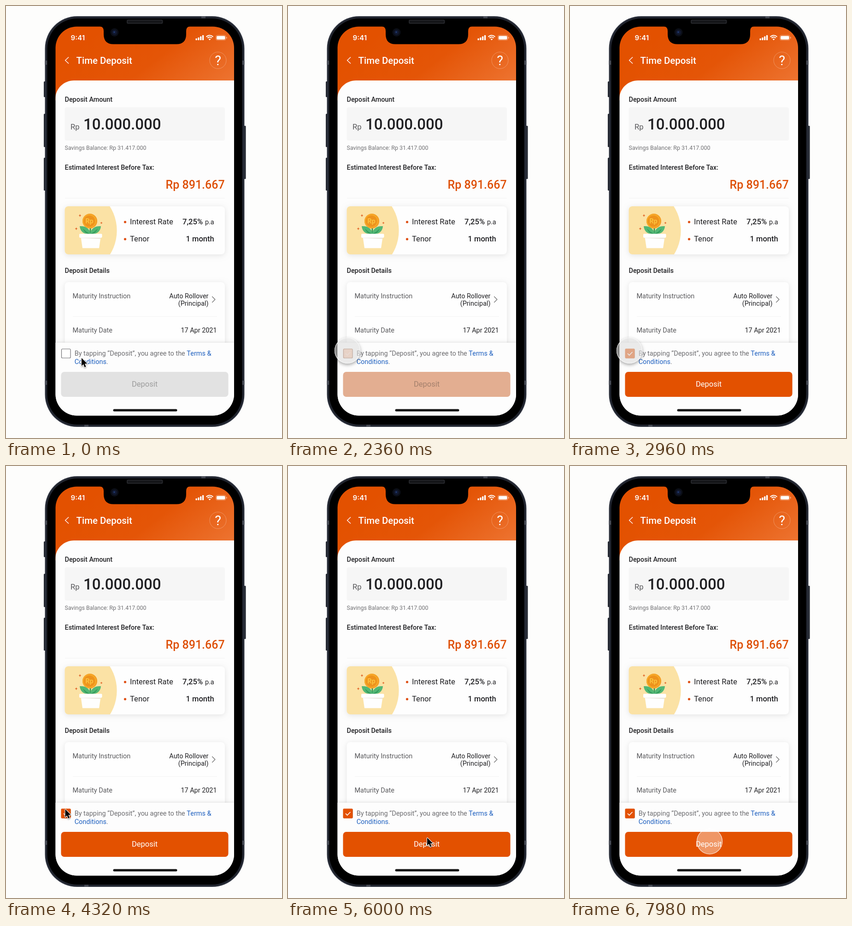
An HTML page with a canvas for the animation above (8 s loop, 599 by 934 pixels).

```html
<!DOCTYPE html>
<html lang="en">
<head>
<meta charset="utf-8">
<title>Time Deposit</title>
<style>
  html, body { margin: 0; width: 100%; height: 100%; overflow: hidden; background: #fdfdfc; }
  canvas { display: block; width: 599px; height: 934px; }
</style>
</head>
<body>
<canvas id="stage"></canvas>
<script>
const W = 599, H = 934, LOOP = 8000;
const ORANGE = '#e35100', INK = '#1f1f22', GREY = '#58585b', PAPER = '#fdfdfd';
const canvas = document.getElementById('stage');
const dpr = Math.max(1, window.devicePixelRatio || 1);
canvas.width = W * dpr;
canvas.height = H * dpr;
const c = canvas.getContext('2d');

const clamp = v => Math.min(1, Math.max(0, v));
const ramp = (t, from, to) => clamp((t - from) / (to - from));
const easeInOut = p => p < .5 ? 4 * p ** 3 : 1 - 4 * (1 - p) ** 3;
const mix = (a, b, p) => a + (b - a) * p;

function box(x, y, w, h, r, fill) {
  c.beginPath();
  c.roundRect(x, y, w, h, r);
  if (fill) { c.fillStyle = fill; c.fill(); }
}

function disc(x, y, r, fill) {
  c.beginPath();
  c.arc(x, y, r, 0, Math.PI * 2);
  c.fillStyle = fill;
  c.fill();
}

function poly(points, fill) {
  c.beginPath();
  points.forEach(([x, y]) => c.lineTo(x, y));
  c.closePath();
  c.fillStyle = fill;
  c.fill();
}

function line(points, color, width) {
  c.beginPath();
  points.forEach(([x, y]) => c.lineTo(x, y));
  c.strokeStyle = color;
  c.lineWidth = width;
  c.stroke();
}

function text(s, x, y, size, color = INK, weight = 400, align = 'left', family = 'Roboto') {
  c.font = `${weight} ${size}px ${family}, sans-serif`;
  c.textAlign = align;
  c.fillStyle = color;
  c.fillText(s, x, y);
}

// Draws with a soft shadow, then restores the context.
function shaded(color, blur, dy, draw) {
  c.save();
  c.shadowColor = color;
  c.shadowBlur = blur * dpr;
  c.shadowOffsetY = dy * dpr;
  draw();
  c.restore();
}

function faded(alpha, draw) {
  if (alpha <= 0) return;
  c.save();
  c.globalAlpha = alpha;
  draw();
  c.restore();
}

function phoneBody() {
  const metal = '#22262f', band = '#484c56';
  [[163, 34], [233, 72], [328, 71]].forEach(([y, h]) => box(82, y, 5, h, 1.5, metal));
  box(515, 259, 5.5, 115, 1.5, metal);
  box(84.5, 22, 433, 888, 70, '#343944');
  box(86, 23.5, 430, 885, 68.5, '#20242e');
  [118, 810].forEach(y => {
    box(84.5, y, 5, 9, 0, band);
    box(512.5, y, 5, 9, 0, band);
  });
  box(424, 22, 9, 4.5, 0, band);
  box(170, 905.5, 9, 4.5, 0, band);
  box(89.5, 27, 423, 878, 65, '#000');
}

function notch() {
  c.beginPath();
  c.moveTo(204, 44);
  c.quadraticCurveTo(212, 45, 212, 54);
  c.lineTo(212, 61);
  c.quadraticCurveTo(212, 82.5, 233, 82.5);
  c.lineTo(370, 82.5);
  c.quadraticCurveTo(391, 82.5, 391, 61);
  c.lineTo(391, 54);
  c.quadraticCurveTo(391, 45, 399, 44);
  c.closePath();
  c.fillStyle = '#000';
  c.fill();
  box(262, 29.5, 78.5, 9, 3, '#25262a');
  box(264, 31.5, 74.5, 5, 2, '#141518');
  disc(235.5, 57, 9, '#0b0e17');
  disc(235.5, 57, 5.5, '#11182f');
  disc(235, 56.5, 2, '#1f3669');
}

function statusBar() {
  text('9:41', 140.5, 73.5, 15.2, '#fff', 600, 'left', 'Inter');
  [4, 6, 8.5, 11].forEach((h, i) => box(411.5 + i * 4.8, 74 - h, 3.3, h, 1, '#fff'));
  c.strokeStyle = '#fff';
  c.lineWidth = 2;
  [10, 6.3].forEach(r => {
    c.beginPath();
    c.arc(442, 73.6, r, -Math.PI * .76, -Math.PI * .24);
    c.stroke();
  });
  poly([[442, 74.2], [439.6, 71.6], [440.8, 70.8], [443.2, 70.8], [444.4, 71.6]], '#fff');
  box(455.5, 63.2, 21.5, 10.8, 3.2);
  c.strokeStyle = 'rgba(255,255,255,.4)';
  c.lineWidth = 1;
  c.stroke();
  box(457, 64.7, 18.5, 7.8, 2, '#fff');
  box(478, 66.8, 1.5, 3.8, 1, 'rgba(255,255,255,.5)');
}

function header() {
  const g = c.createLinearGradient(230, 30, 400, 250);
  g.addColorStop(0, '#e35100');
  g.addColorStop(.45, '#e45507');
  g.addColorStop(1, '#ee7634');
  c.fillStyle = g;
  c.fillRect(107, 44, 389, 160);
  line([[136, 110.5], [128.6, 117.5], [136, 124.5]], '#fff', 1.3);
  text('Time Deposit', 152.6, 124.7, 20.4, '#fff', 500);
  c.beginPath();
  c.arc(460, 117.5, 18, 0, Math.PI * 2);
  c.strokeStyle = 'rgba(255,255,255,.28)';
  c.lineWidth = 1;
  c.stroke();
  text('?', 460, 127.8, 29, '#fff', 400, 'center');
}

function leaf(dir) {
  c.save();
  c.translate(183, 493);
  c.scale(dir, 1);
  c.beginPath();
  c.moveTo(0, 0);
  c.bezierCurveTo(1, -12, 10, -18, 23, -17);
  c.bezierCurveTo(22, -5, 14, 1, 0, 0);
  c.fillStyle = '#52b774';
  c.fill();
  c.beginPath();
  c.moveTo(0, 0);
  c.quadraticCurveTo(10, -5, 16, -12);
  c.quadraticCurveTo(12, 0, 0, 0);
  c.fillStyle = '#349a5c';
  c.fill();
  c.restore();
}

function sparkle(x, y, r) {
  const pts = [];
  for (let i = 0; i < 8; i++) {
    const a = i * Math.PI / 4, d = i % 2 ? r * .35 : r;
    pts.push([x + d * Math.cos(a), y + d * Math.sin(a)]);
  }
  poly(pts, '#dd571c');
}

function plant() {
  c.save();
  box(127.5, 433, 347.5, 104, 8);
  c.clip();
  disc(143.4, 485.5, 97.2, '#fbe2a5');
  c.restore();
  box(181.5, 476, 3, 18, 1, '#349a5c');
  leaf(1);
  leaf(-1);
  disc(182, 465, 16, '#f39a21');
  disc(181, 465, 15, '#f7a928');
  disc(181, 465, 12.3, '#ee931d');
  text('Rp', 181, 470.2, 14.5, '#fbc23e', 700, 'center');
  poly([[162.5, 500], [205.5, 500], [202, 523.5], [166, 523.5]], '#fefefe');
  poly([[162.5, 500], [205.5, 500], [205, 503.5], [163, 501.5]], '#e9e4dc');
  box(159, 492.5, 49.5, 8.5, 2, '#fff');
  sparkle(160.5, 453, 3.2);
  sparkle(152.5, 481.5, 3.2);
  sparkle(207, 469, 2.8);
}

function content() {
  c.beginPath();
  c.moveTo(107, 201);
  c.bezierCurveTo(107, 179, 125, 161, 148, 161);
  c.lineTo(496, 161);
  c.lineTo(496, 887);
  c.lineTo(107, 887);
  c.fillStyle = PAPER;
  c.fill();

  text('Deposit Amount', 127.5, 207.4, 14.4, INK, 500);
  box(127.5, 219, 347.5, 72, 4, '#f6f6f6');
  text('Rp', 140, 266.5, 16.5, GREY);
  text('10.000.000', 168, 267, 33, INK, 500);
  text('Savings Balance: Rp 31.417.000', 127.5, 311.3, 12.45, '#707073');
  text('Estimated Interest Before Tax:', 127.5, 353.6, 14.4, INK, 500);
  text('Rp 891.667', 474.7, 395, 25, '#de4f06', 500, 'right');
  line([[128, 415.5], [475, 415.5]], '#f3f3f3', 1);

  shaded('rgba(0,0,0,.10)', 12, 2, () => box(127.5, 433, 347.5, 104, 8, '#fefefe'));
  plant();
  [467, 504].forEach(y => disc(258.5, y, 2.6, '#df4f14'));
  text('Interest Rate', 269, 472, 16.6);
  text('7,25%', 383, 472, 16.6, INK, 500);
  text('p.a', 451.7, 472, 14.4, INK, 400, 'right');
  text('Tenor', 269, 509, 16.6);
  text('1 month', 451.7, 509, 16.5, INK, 500, 'right');

  text('Deposit Details', 127.5, 576.6, 14.4, INK, 500);
  shaded('rgba(0,0,0,.10)', 12, 2, () => box(127.5, 597, 347.5, 180, 8, '#fefefe'));
  text('Maturity Instruction', 144.5, 631.5, 14.45, GREY);
  text('Auto Rollover', 439.5, 631.5, 14.4, INK, 400, 'right');
  text('(Principal)', 439.5, 647.7, 14.4, INK, 400, 'right');
  line([[447.3, 628], [453.8, 634.5], [447.3, 641]], '#6a6a6a', 1.2);
  line([[145, 671.5], [458, 671.5]], '#f3f3f3', 1);
  text('Maturity Date', 144.5, 705.7, 14.45, GREY);
  text('17 Apr 2021', 457.5, 705.7, 14.4, INK, 400, 'right');
}

function footer(checked) {
  shaded('rgba(0,0,0,.12)', 6, -1, () => box(107, 728, 389, 159, 0, PAPER));
  const terms = 'By tapping “Deposit”, you agree to the ';
  text(terms, 148.7, 755.5, 14.45, '#6d6d70');
  text('Terms &', 148.7 + c.measureText(terms).width, 755.5, 14.45, '#1d5fbf');
  text('Conditions', 148.7, 773.7, 14.45, '#1d5fbf');
  text('.', 148.7 + c.measureText('Conditions').width, 773.7, 14.45, '#6d6d70');

  box(120.5, 741.5, 19.5, 19.5, 2, '#fff');
  c.strokeStyle = '#6f6f72';
  c.lineWidth = 1.2;
  c.stroke();
  box(119.5, 791, 363, 54, 7, '#e2e2e2');

  faded(checked, () => {
    box(119.5, 740.8, 21, 21, 2, ORANGE);
    line([[125, 751.3], [128.6, 755], [135.5, 748]], '#fff', 1.6);
    box(119.5, 791, 363, 54, 7, ORANGE);
  });
  // The label stays dark for most of the fade, then turns white.
  const lit = checked ** 3;
  text('Deposit', 301, 823, 16.5, `rgba(0,0,0,${.31 * (1 - lit)})`, 400, 'center');
  text('Deposit', 301, 823, 16.5, `rgba(255,255,255,${lit})`, 400, 'center');
  box(232.5, 871.4, 139, 5, 2.5, '#111');
}

function cursor(x, y) {
  const arrow = [[0, 0], [0, 17.2], [3.9, 13.6], [6.6, 20], [9.6, 18.7], [6.9, 12.5], [12.2, 12.3]];
  c.save();
  c.translate(x, y);
  c.lineJoin = 'round';
  shaded('rgba(0,0,0,.35)', 3, 1.5, () => {
    line([...arrow, arrow[0]], '#fff', 2.2);
  });
  poly(arrow, '#000');
  c.restore();
}

function touch(x, y, shadow) {
  if (shadow) {
    shaded('rgba(0,0,0,.35)', 7, 3, () => {
      // Clip away the inside so that only the outer shadow is kept.
      c.beginPath();
      c.rect(x - 60, y - 60, 120, 120);
      c.arc(x, y, 28, 0, Math.PI * 2);
      c.clip('evenodd');
      disc(x, y, 28, '#fff');
    });
    disc(x, y, 28, 'rgba(0,0,0,.16)');
  }
  disc(x, y, 28, shadow ? 'rgba(255,255,255,.52)' : 'rgba(255,255,255,.4)');
  c.beginPath();
  c.arc(x, y, 27.5, 0, Math.PI * 2);
  c.strokeStyle = 'rgba(255,255,255,.75)';
  c.lineWidth = 1.2;
  c.stroke();
}

function draw(t) {
  c.setTransform(dpr, 0, 0, dpr, 0, 0);
  c.fillStyle = '#fdfdfc';
  c.fillRect(0, 0, W, H);
  phoneBody();
  c.save();
  box(107.5, 44.5, 387.5, 841, 46);
  c.clip();
  header();
  content();
  footer(ramp(t, 2140, 2750));
  c.restore();
  notch();
  statusBar();

  const toBox = easeInOut(ramp(t, 0, 1400));
  const toButton = easeInOut(ramp(t, 4500, 5950));
  const x = mix(mix(164, 128.5, toBox), 302, toButton);
  const y = mix(mix(761, 742, toBox), 803.5, toButton);
  const tick = ramp(t, 1550, 1950) - ramp(t, 3400, 3850);
  const press = ramp(t, 7450, 7900);

  faded(tick, () => touch(129, 745, true));
  faded(press, () => touch(303, 811.5, false));
  faded(1 - tick - press, () => cursor(x, y));
}

function frame() {
  draw(performance.now() % LOOP);
  requestAnimationFrame(frame);
}
frame();
</script>
</body>
</html>
```
